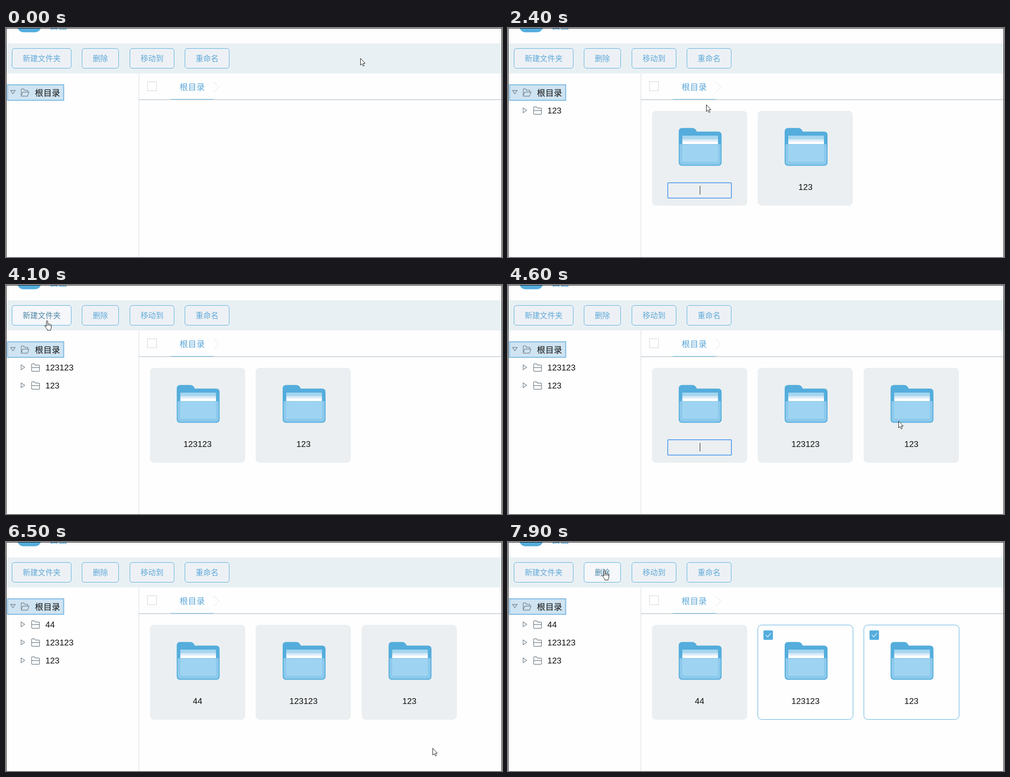
These frames come from a looping animation (1099 px wide and 509 px high, 8 s). An HTML page:

```html
<!DOCTYPE html>
<html lang="zh-CN">
<head>
<meta charset="utf-8">
<title>文件夹管理</title>
<style>
  html, body { margin: 0; width: 100%; height: 100%; overflow: hidden; background: #fefefe; }
  svg { display: block; }
  text { font-family: "Liberation Sans", Arial, "Noto Sans CJK SC", "Noto Sans CJK", sans-serif; font-size: 18.7px; }
  .cjk { font-family: "Noto Sans CJK SC", "Noto Sans CJK", sans-serif; }
  .btn { font-size: 16.8px; fill: #5ea8d8; }
  .over .btn { fill: #4d86a6; }
  .line { fill: none; stroke: #7b8790; stroke-width: 1.4; stroke-linejoin: round; }
</style>
</head>
<body>
<svg width="1099" height="509" viewBox="0 0 1099 509">
  <defs>
    <g id="folder">
      <path fill="#54addc" d="M0 8Q0 0 8 0H30Q37 0 40 8H87Q95 8 95 16V76Q95 84 87 84H8Q0 84 0 76Z"/>
      <path fill="#a6d6ef" d="M8 17H87V26H8Z"/>
      <path fill="#dcecf6" d="M8 25H87V31H8Z"/>
      <path fill="#fff" d="M8 30H87V36H8Z"/>
      <path fill="#8cc9ec" d="M2 36H93V75Q93 82 86 82H9Q2 82 2 75Z"/>
      <path fill="#9ed4f1" d="M8 37H87V75H8Z"/>
    </g>
    <path id="closed" class="line" d="M.7 15.5V2.5Q.7.7 2.5.7H7L9.5 3.5H16.5Q18.3 3.5 18.3 5.3V15.5Q18.3 17.3 16.5 17.3H2.5Q.7 17.3.7 15.5ZM.7 9H18.3"/>
    <path id="arrow" d="M.5.5V15.6L3.9 12.5L6.3 17.8L8.7 16.8L6.4 11.6H10.8Z" fill="#fff" stroke="#111"/>
    <g id="hand" transform="translate(-6 0)">
      <path d="M4.5 13V2Q4.5.5 6 .5T7.5 2V8Q8 7 9.2 7.2T10.5 8.4Q11 7.6 12.2 8T13.3 9.3Q14 8.7 14.9 9.3T15.5 11V15Q15.5 17.5 14 19V21.5H6.5V19.5Q4.5 17.5 3.5 15.5L.8 12.3Q.5 11 1.6 10.7T4.5 13Z" fill="#fff" stroke="#111"/>
      <path d="M7.5 8V12M10.5 9V12M13.3 10V12.5" stroke="#111" stroke-width=".9"/>
    </g>
  </defs>

  <rect width="1099" height="509" fill="#fefefe"/>
  <rect x="25" y="-44" width="53" height="53.5" rx="14" fill="#54addc"/>
  <text class="cjk" x="96.5" y="3" font-weight="500" style="font-size:19.5px" fill="#5ea8d8">云盘</text>
  <rect y="34" width="1099" height="67" fill="#e9f0f4"/>
  <g id="buttons"></g>

  <rect x="3.25" y="126.25" width="124.5" height="34.5" fill="#cfe4f2" stroke="#8bc1e5" stroke-width="2.5"/>
  <path class="line" d="M10 138.7H20.5L15.2 146.3Z"/>
  <path class="line" d="M33.7 150V137Q33.7 135.5 35.2 135.5H39L41.5 138.5H47Q48.3 138.5 48.3 140V142M33.7 151L37 142.5H51L47.5 151.5H34.5Z"/>
  <text class="cjk" x="64" y="151" fill="#111">根目录</text>
  <g id="tree"></g>

  <path d="M294.5 101V509" stroke="#d3d9dd"/>
  <rect x="295" y="158" width="804" height="2.4" fill="#d3dade"/>
  <rect x="365" y="158" width="95" height="1" fill="#54addc"/>
  <rect x="313.5" y="119.5" width="20" height="20" fill="#fff" stroke="#ccd3d8"/>
  <text class="cjk" x="384.5" y="138" fill="#5ea8d8">根目录</text>
  <path d="M460.5 120L471.5 131.5L460.5 143" fill="none" stroke="#dbe1e5"/>
  <g id="cards"></g>
  <g id="overlay"></g>
  <path d="M.5 509V.5H1098.5V509" fill="none" stroke="#000"/>
</svg>
<script>
const STEP = 100, LOOP = 8000; // all times below are in steps
const BLUE = '#54addc', GREEN = '#87d08d', AMBER = '#f5b25f';
const byId = id => document.getElementById(id);
const clamp = (v, lo, hi) => Math.min(hi, Math.max(lo, v));

// Labels sit in 24px of padding, with 23.4px between buttons
let edge = 13;
const buttons = ['新建文件夹', '删除', '移动到', '重命名'].map(label => {
  const b = { label, x: Math.round(edge), w: Math.round(label.length * 16.6 + 49) };
  edge += b.w + 23.4;
  return b;
});

// Folders in order of creation
const folders = [
  { name: '123', open: 7, type: 10, save: 13 },
  { name: '123123', open: 21, type: 25, save: 33 },
  { name: '44', open: 42, type: 59, save: 65, draft: { name: '123', type: 47, reject: 53 } }
];

const create = [91, 79], remove = [214, 63], rest = [945, 458];
const DRAG = 67, DROP = 71;
const path = [
  { at: 0, to: [785, 67] }, { at: 5, to: create }, { at: 7, to: create },
  { at: 13, to: [754, 290] }, { at: 16, to: [151, 55] }, { at: 18, to: [148, 60] },
  { at: 20, to: create }, { at: 21, to: create },
  { at: 28, to: [904, 292] }, { at: 32, to: [863, 254] }, { at: 34, to: [569, 87] },
  { at: 38, to: create }, { at: 41, to: create },
  { at: 47, to: [1020, 346] }, { at: 49, to: [960, 481] }, { at: 54, to: [952, 439] },
  { at: 59, to: rest }, { at: DRAG, to: rest },
  { at: 69, to: [852, 452] }, { at: 70, to: [661, 312] }, { at: 72, to: [575, 212] },
  { at: 75, to: [390, 78] }, { at: 79, to: remove }
];

function pointerAt(s) {
  const i = Math.max(1, path.findIndex(p => p.at >= s));
  const a = path[i - 1], b = path[i], k = (s - a.at) / (b.at - a.at);
  return a.to.map((v, j) => Math.round(v + (b.to[j] - v) * k));
}

// Content of the name field while a folder is being named
function fieldAt(f, s) {
  const d = f.draft;
  if (d && s < f.type) return { text: d.name.slice(0, clamp(s - d.type + 1, 0, 9)), selected: s >= d.reject };
  return { text: f.name.slice(0, clamp(s - f.type + 1, 0, 9)), selected: false };
}

function toastAt(s) {
  const live = (start, life) => s >= start && s < start + life;
  if (folders.some(f => live(f.save + 2, 5))) return { x: 778, w: 227, color: GREEN };
  if (folders.some(f => f.draft && live(f.draft.reject + 2, 7))) return { x: 788, w: 206, color: AMBER };
}

const cardX = i => 318.5 + i * 234.7;
const inside = (x, y, l, t, w, h) => x >= l && x < l + w && y >= t && y < t + h;

function button({ label, x, w }, over) {
  return `<g class="${over ? 'over' : ''}">
    <rect x="${x + .5}" y="45.5" width="${w - 1}" height="44" rx="5.5" fill="${over ? '#f5f7fa' : '#edf1f5'}" stroke="${BLUE}"/>
    <text class="cjk btn" x="${x + w / 2}" y="73.5" text-anchor="middle">${label}</text></g>`;
}

function treeRow({ name }, i) {
  const y = 183 + i * 40;
  return `<path class="line" d="M33.5 ${y - 5.5}L41.5 ${y}L33.5 ${y + 5.5}Z"/>
    <use href="#closed" x="56" y="${y - 8.5}"/><text x="87.3" y="${y + 7}" fill="#111">${name}</text>`;
}

function nameField(cx, { text, selected }) {
  const half = text.length * 16.4 * .556 / 2;
  const mark = selected
    ? `<rect x="${cx - half}" y="351" width="${half * 2}" height="19" fill="#3390ff"/>`
    : `<path d="M${Math.round(cx + half) + .5} 351V370" stroke="#111"/>`;
  return `<rect x="354" y="344" width="141" height="34" rx="1.5" fill="#ebeff1" stroke="#62a3f0" stroke-width="2"/>${mark}
    <text x="${cx}" y="366" text-anchor="middle" style="font-size:16.4px" fill="${selected ? '#fff' : '#111'}">${text}</text>`;
}

function card({ name, field }, i, picked) {
  const x = cardX(i), left = Math.round(x), cx = x + 106;
  const frame = picked
    ? `<rect x="${left + .5}" y="184.5" width="211" height="210" rx="9" fill="#fefefe" stroke="${BLUE}"/>
       <rect x="${left + 13}" y="196.5" width="21" height="21" rx="2" fill="${BLUE}"/>
       <path d="M${left + 18} 206.5l4.5 4.5l7-8.5" fill="none" stroke="#e8f5fc" stroke-width="1.3"/>`
    : `<rect x="${left}" y="184" width="211" height="211" rx="9" fill="#ebeff1"/>`;
  const label = field ? nameField(cx, field)
    : `<text x="${cx}" y="360" text-anchor="middle" fill="#111">${name}</text>`;
  return `${frame}<use href="#folder" x="${x + 59.8}" y="222.3"/>${label}`;
}

function draw(s) {
  const [x, y] = pointerAt(s);
  const over = buttons.map(b => inside(x, y, b.x, 45, b.w, 45));
  const saved = folders.filter(f => s >= f.save).reverse();
  const naming = folders.find(f => s >= f.open && s < f.save);
  const shown = naming ? [{ field: fieldAt(naming, s) }, ...saved] : saved;

  // The band trails the pointer slightly and picks every card it reaches
  const [bx, by] = pointerAt(clamp(s, DRAG, DROP) - .15);
  const picked = shown.map((f, i) => by < 395 && bx < cardX(i) + 211);
  const overCheck = picked.some((p, i) => p && inside(x, y, cardX(i) + 13, 196, 21, 21));

  byId('buttons').innerHTML = buttons.map((b, i) => button(b, over[i])).join('');
  byId('tree').innerHTML = saved.map(treeRow).join('');
  byId('cards').innerHTML = shown.map((f, i) => card(f, i, picked[i])).join('');

  let top = '';
  if (s > DRAG && s <= DROP) {
    top += `<rect x="${bx + .5}" y="${by + .5}" width="${rest[0] - bx}" height="${rest[1] - by}"
      fill="rgba(120,207,229,.62)" stroke="#111" stroke-dasharray="1 1"/>`;
  }
  const toast = toastAt(s);
  if (toast) top += `<rect x="${toast.x}" y="-31" width="${toast.w}" height="46" rx="23" fill="${toast.color}"/>`;
  const shape = over.includes(true) || overCheck ? 'hand' : 'arrow';
  byId('overlay').innerHTML = `${top}<use href="#${shape}" x="${x}" y="${y}"/>`;
}

const start = performance.now();
let last = -1;
function tick() {
  const s = Math.floor((performance.now() - start) % LOOP / STEP);
  if (s !== last) draw(last = s);
  requestAnimationFrame(tick);
}
tick();
</script>
</body>
</html>
```
